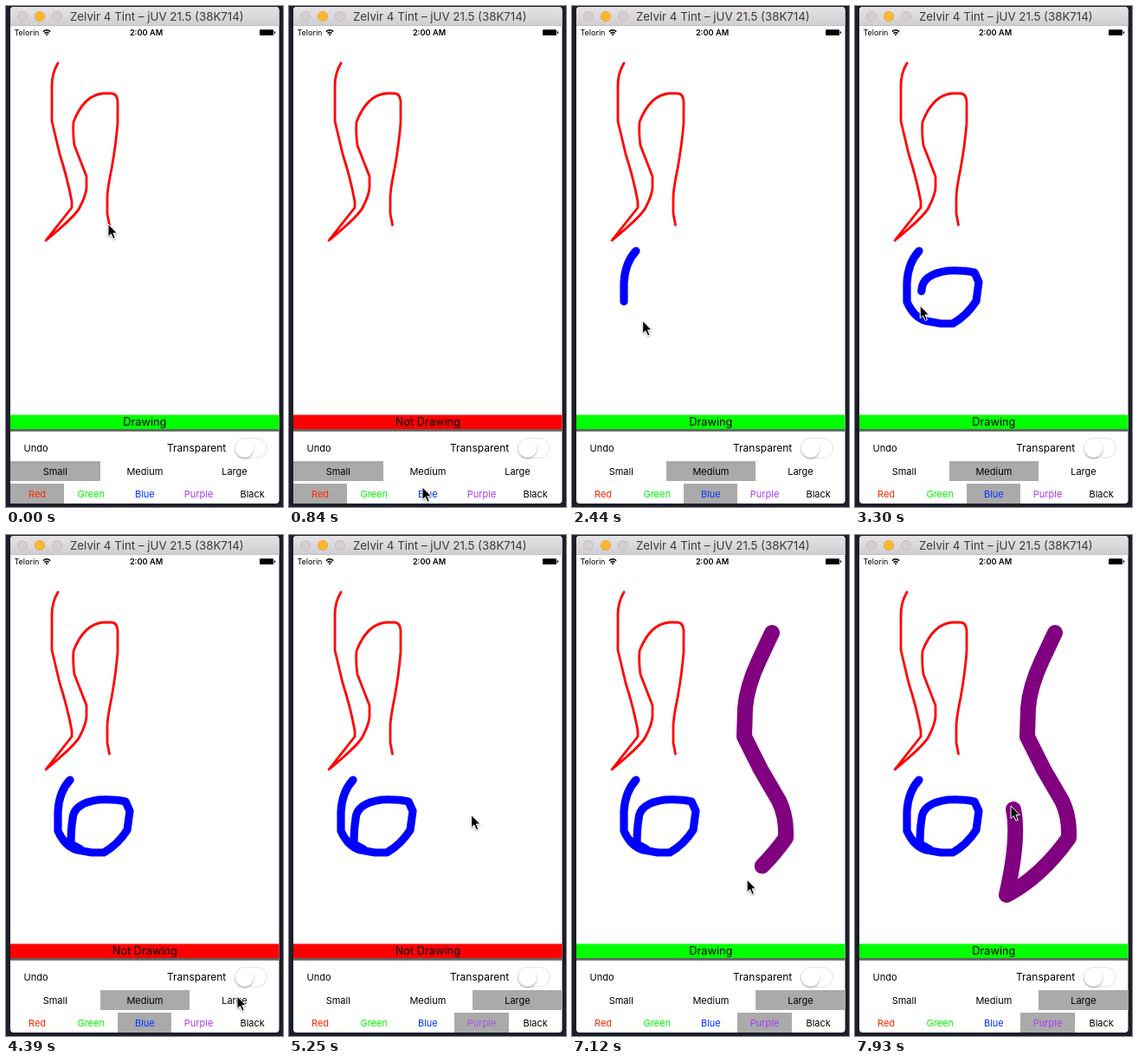
Animation, 320 px wide and 579 px high, one loop 7.99 s. Source, as an HTML page:

```html
<!DOCTYPE html>
<html lang="en">
<head>
<meta charset="utf-8">
<title>Drawing app</title>
<style>
  html, body { margin: 0; width: 100%; height: 100%; overflow: hidden; background: #1c1e2a; }
  svg { display: block; width: 100%; height: 100%; }
  text { font-family: Inter, "Open Sans", sans-serif; font-size: 11px; }
  .mid { text-anchor: middle; }
  .ink { fill: none; stroke-linecap: round; stroke-linejoin: round; }
  .crisp { shape-rendering: crispEdges; }
</style>
</head>
<body>
<svg viewBox="0 0 320 579">
  <defs>
    <linearGradient id="chrome" x2="0" y2="1">
      <stop offset="0" stop-color="#e6e3e6"/>
      <stop offset="1" stop-color="#d0cdd0"/>
    </linearGradient>
    <filter id="soft" x="-50%" y="-50%" width="200%" height="200%">
      <feDropShadow dx="0" dy="1.5" stdDeviation="1.1" flood-opacity=".35"/>
    </filter>
  </defs>

  <rect width="320" height="579" fill="#1c1e2a"/>
  <path d="M5 20V5q0-4 4-4H311.5q4 0 4 4V571q0 4-4 4H9q-4 0-4-4Z" fill="#fff"/>
  <path d="M5 23V5q0-4 4-4H311.5q4 0 4 4V23Z" fill="url(#chrome)"/>
  <path d="M5 22.7H315.5" stroke="#b3b0b3" stroke-width=".6"/>
  <g stroke-width=".7" stroke="#b9b5b9" fill="#d2ced2">
    <circle cx="19" cy="12" r="5.6"/>
    <circle cx="39" cy="12" r="5.6" fill="#fdb72d" stroke="#e09e25"/>
    <circle cx="59" cy="12" r="5.6"/>
  </g>
  <text x="74" y="16.9" style="font-size:13.3px" fill="#3c3a3c">Zelvir 4 Tint – jUV 21.5 (38K714)</text>

  <text x="9.5" y="34" style="font-size:9px">Telorin</text>
  <path d="M42.8 29.6q4.2-3.6 8.4 0M44.5 31.6q2.5-2.1 5 0" fill="none" stroke="#000" stroke-width="1.4"/>
  <path d="M45.5 32.7q1.5-1 3 0L47 34.4Z"/>
  <text class="mid" x="162" y="34" style="font-size:9.2px;font-weight:600">2:00 AM</text>
  <rect x="293" y="27.3" width="16" height="6.8" rx="1.2"/>
  <rect x="309.8" y="29.2" width="1.3" height="3" rx=".6"/>

  <g id="inks"></g>

  <rect id="bar" x="5" y="472.5" width="310.5" height="17"/>
  <rect x="5" y="489" width="310.5" height="2.7" fill="#626262"/>
  <text id="status" class="mid" x="160.3" y="485.4" style="font-size:12.8px"></text>

  <text x="20.5" y="515">Undo</text>
  <text x="186" y="515.3" style="font-size:12px">Transparent</text>
  <rect x="264.4" y="499.6" width="37" height="22.6" rx="11.3" fill="#fff" stroke="#e2e2e2"/>
  <circle cx="275.4" cy="510.9" r="10.6" fill="#fff" filter="url(#soft)"/>

  <g id="buttons"></g>

  <path id="cursor" d="M0 0V14.6L3.4 11.5L5.9 17.2L8.3 16.2L5.9 10.6H10.4Z"
        stroke="#fff" stroke-width="1" stroke-linejoin="round" filter="drop-shadow(0 1px 1px #0005)"/>
</svg>

<script>
const LOOP = 7990, LAG = 100, FADE = 360;
const $ = id => document.getElementById(id);
const clamp = k => Math.max(0, Math.min(1, k));
const mix = (a, b, k) => a + (b - a) * k;
const show = (el, on) => el.setAttribute('visibility', on ? 'visible' : 'hidden');

function make(parent, tag, attrs, label) {
  const el = document.createElementNS('http://www.w3.org/2000/svg', tag);
  for (const k in attrs) el.setAttribute(k, attrs[k]);
  if (label) el.textContent = label;
  return parent.appendChild(el);
}

// Share of the stroke covered at time t, linear between beats [time, share]
function share(beats, t) {
  let v = 0;
  beats.forEach(([end, to], i) => {
    const start = i ? beats[i - 1][0] : end - 1;
    v = mix(v, to, clamp((t - start) / (end - start)));
  });
  return v;
}

function stroke(color, width, d, beats = [[0, 1]]) {
  const el = make($('inks'), 'path', { class: 'ink', stroke: color, 'stroke-width': width, d });
  return { el, beats, len: el.getTotalLength(), from: beats[0][0], to: beats[beats.length - 1][0] };
}

const red = stroke('#f00', 2.8,
  'M60 66Q53 78 53 92V133L62 171Q71 199 76 226V233L46 271Q80 243 85 233Q92 220 93 210V197' +
  'L79 161Q77 148 78 134Q90 103 112 101H122Q128 101 129 110V135Q127 160 122 188Q117 212 117 222V240L119.5 253',
  [[-LAG, 1]]);
const blue = stroke('#00f', 9.2,
  'M74 283Q61 297 60 320V342Q68 360 82 364L99 367H113Q129 358 140 341L143 319L138 308' +
  'Q125 305 107 306Q78 310 77 328Q75 340 75 357L86 363',
  [[2150, 0], [2900, .78], [3200, .87], [3400, .98], [3760, 1]]);
const purple = stroke('#800080', 18,
  'M231 113L216 145Q202 175 200 200L199 233L218 271L239 307Q248 325 247 350Q215 395 175 416Q190 350 183 317',
  [[5750, 0], [6310, .37], [6410, .505], [6650, .555], [6830, .555], [7250, .775], [7830, 1]]);
const strokes = [red, blue, purple];

// Pointer trips: start, end, goal
const trips = [
  [60, 320, 140, 551], [560, 800, 154, 556], [950, 1260, 140, 536],
  [1380, 1680, 69, 302], [1700, 2000, 74, 283],
  [blue.from, blue.to, 86, 363], [3780, 4390, 267, 533], [4620, 4900, 225, 556],
  [5000, 5360, 209, 300], [5480, 5720, 231, 113],
  [purple.from, purple.to, 183, 317], [7830, 7930, 180, 313]
];

// While drawing, the pointer runs along the stroke; otherwise it eases between places
function pointer(t) {
  const s = strokes.find(s => t >= s.from && t < s.to);
  if (s) return s.el.getPointAtLength(s.len * share(s.beats, t));
  const p = { x: 118, y: 252 };
  for (const [start, end, x, y] of trips) {
    const k = 1 - (1 - clamp((t - start) / (end - start))) ** 2;
    p.x = mix(p.x, x, k);
    p.y = mix(p.y, y, k);
  }
  return p;
}

// Each button: label, colour, time it is chosen, time it is left
const buttons = [];
function row(y, items) {
  const w = 310.7 / items.length;
  items.forEach(([label, fill, on = Infinity, off = Infinity], i) => {
    const x = 5 + w * i;
    buttons.push({
      on, off,
      box: make($('buttons'), 'rect', { class: 'crisp', x, y, width: w, height: 23, fill: '#aaa' }),
      text: make($('buttons'), 'text', { class: 'mid', x: x + w / 2, y: y + 15.6, fill }, label)
    });
  });
}
row(526, [['Small', '#000', -FADE, 1430], ['Medium', '#000', 1430, 4480], ['Large', '#000', 4480]]);
row(552, [
  ['Red', '#ff2600', -FADE, 900], ['Green', '#00f900'], ['Blue', '#0433ff', 900, 5000],
  ['Purple', '#a93cf0', 5000], ['Black', '#000']
]);

function render(t) {
  for (const s of strokes) {
    show(s.el, t >= s.from);
    const inked = Math.max(.01, s.len * share(s.beats, t - LAG));
    s.el.setAttribute('stroke-dasharray', `${inked} ${s.len * 2}`);
  }

  for (const b of buttons) {
    const chosen = t >= b.on && t < b.off;
    show(b.box, chosen);
    b.text.setAttribute('opacity', chosen ? mix(.25, 1, clamp((t - b.on) / FADE)) : 1);
  }

  const drawing = t < 120 || strokes.some(s => t >= s.from - 50 && t < s.to + LAG) && t > 120;
  $('bar').setAttribute('fill', drawing || t >= purple.from ? '#0f0' : '#f00');
  $('status').textContent = drawing || t >= purple.from ? 'Drawing' : 'Not Drawing';

  const { x, y } = pointer(t);
  $('cursor').setAttribute('transform', `translate(${x.toFixed(2)} ${y.toFixed(2)})`);
}

const start = performance.now();
function tick() {
  render((performance.now() - start) % LOOP);
  requestAnimationFrame(tick);
}
tick();
</script>
</body>
</html>
```
